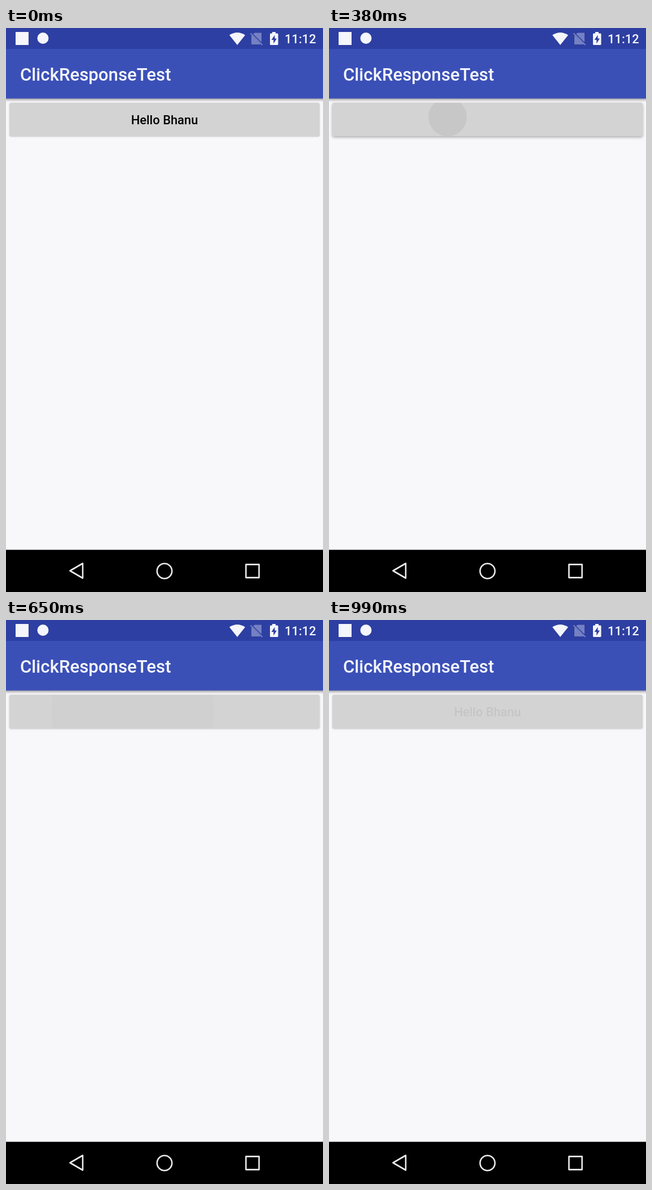
An HTML page for the animation above (1.02 s loop, 562x996 px).

```html
<!DOCTYPE html>
<html lang="en">
<head>
<meta charset="utf-8">
<title>Button tap</title>
<style>
  html, body { margin: 0; width: 100%; height: 100%; overflow: hidden; background: #f8f7f9; }
  div, svg { position: absolute; }
  svg { left: 0; top: 0; }
  #button { left: 6px; top: 132px; width: 550px; height: 59px; border-radius: 3px;
    background: #d3d3d4; overflow: hidden; }
  #ripple { border-radius: 50%; background: #000; transform: translate(-50%, -50%); }
  #bar { filter: drop-shadow(0 2px 2.5px rgba(0, 0, 0, .42)); }
  text { font-family: Roboto, sans-serif; font-weight: 500; }
</style>
</head>
<body>
<div id="button"><div id="ripple"></div></div>
<svg width="562" height="996" viewBox="0 0 562 996">
  <rect id="bar" x="-10" width="582" height="124.5" fill="#3b50b7"/>
  <rect width="562" height="37" fill="#2d3fa2"/>
  <rect y="921.5" width="562" height="75" fill="#000"/>
  <g fill="#f5f6fb">
    <rect x="17" y="7" width="23" height="23"/>
    <circle cx="65.5" cy="18" r="10"/>
    <path d="M396 12.5Q410 3.5 424 12.5L410 30Z"/>
    <g opacity=".36">
      <path d="M441 8.5H453V25L438 10.5ZM436 13L452 29H435V14Z"/>
      <path d="M433.5 9.5L454.5 30" stroke="#f5f6fb" stroke-width="2"/>
    </g>
    <path d="M472 7h6v2.5h3q1.500 0 1.500 1.500V28.500q0 1.500 -1.500 1.500H469.500q-1.500 0 -1.500 -1.500V11q0 -1.500 1.500 -1.500H472Z"/>
    <path d="M476.500 12.500L470.500 21H474.300V27.500L480 18.500H476.500Z" fill="#2d3fa2"/>
    <text x="494" y="27.3" font-size="21.9">11:12</text>
    <text x="25" y="93" font-size="31.2">ClickResponseTest</text>
  </g>
  <text id="label" x="281" y="170" font-size="21.9" text-anchor="middle">Hello Bhanu</text>
  <g fill="none" stroke="#ececec" stroke-width="2.6" stroke-linejoin="round">
    <path d="M113.500 958.500L136 945.500V971.500Z"/>
    <circle cx="281" cy="959" r="13.2"/>
    <rect x="425.4" y="947.4" width="23.2" height="23.2"/>
  </g>
</svg>
<script>
  const LOOP = 1020, TICK = 38.43, TAP = 343, CLEAR = 375;

  const $ = id => document.getElementById(id);
  const button = $("button"), ripple = $("ripple"), label = $("label");
  const ramp = (t, from, to) => Math.min(1, Math.max(0, (t - from) / (to - from)));

  function draw(t) {
    // the button rises when pressed and sinks most of the way back
    const lift = ramp(t, 200, 300) * (1 - 0.8 * ramp(t, 390, 480));
    button.style.boxShadow =
      `0 ${1 + lift}px ${2.5 + 3 * lift}px rgba(0,0,0,${0.2 + 0.12 * lift})`;

    // the ripple slows as it grows, drifts to the middle and fades
    const grow = 1 - Math.exp(-Math.max(0, t - TAP) / 205);
    const size = 370 * grow + "px";
    Object.assign(ripple.style, {
      left: 200 + 24 * grow + "px",
      top: 24 + 8 * grow + "px",
      width: size,
      height: size,
      opacity: 0.055 * (1 - ramp(t, 380, 760))
    });

    label.style.opacity = t < CLEAR ? 1 : 0.058 * ramp(t, 745, 990);
  }

  function frame() {
    const t = performance.now() % LOOP;
    draw(Math.floor((t + 10) / TICK) * TICK);
    requestAnimationFrame(frame);
  }
  frame();
</script>
</body>
</html>
```
